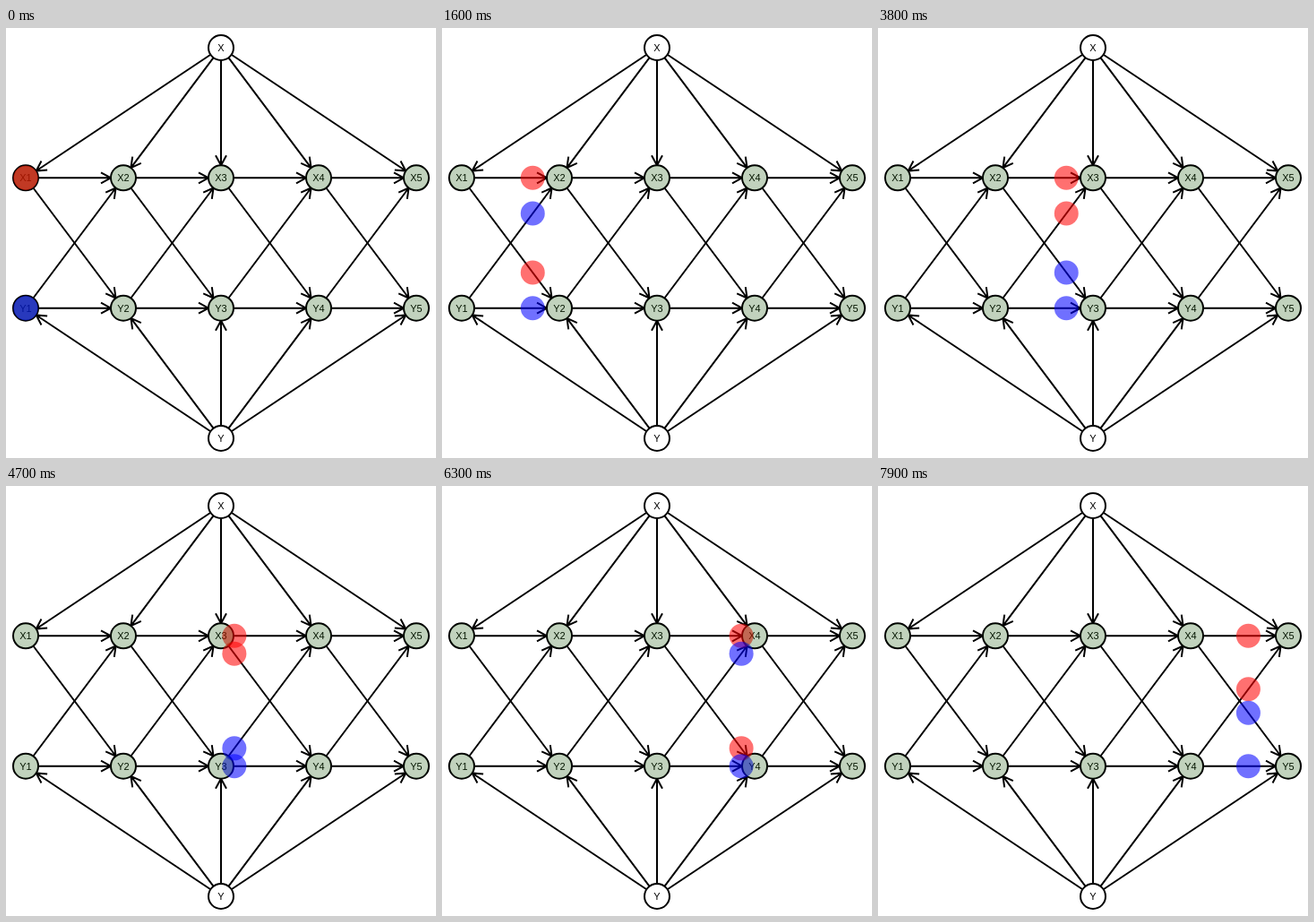
An HTML page for the animation above (8000 ms loop, 480 by 480 pixels).

```html
<!DOCTYPE html>
<html lang="en">
<head>
<meta charset="utf-8">
<title>Message passing on a layered graph</title>
<style>
  html, body { margin: 0; width: 100%; height: 100%; overflow: hidden; background: #fff; }
  svg { display: block; width: 100vw; height: 100vh; }
  .edge { fill: none; stroke: #000; stroke-width: 2; }
  .node { fill: #fff; stroke: #000; stroke-width: 2; }
  .tint { fill: rgb(16, 82, 1); fill-opacity: .26; }
  .red { fill: #f00; fill-opacity: .56; }
  .blue { fill: #00f; fill-opacity: .56; }
  text { font: 11px "Liberation Sans", Arial, sans-serif; text-anchor: middle; }
</style>
</head>
<body>
<svg viewBox="0 0 480 480"></svg>
<script>
const svg = document.querySelector("svg");
const LOOP = 8000, STEP = 100, HOP = 2200;
const LEFT = 22, GAP = 109, COLS = 5, MID = 240;
const ROW = { X: 167.3, Y: 312.7 };
const RADIUS = 14, DOT = 13.5;

function add(tag, attrs) {
  const el = document.createElementNS("http://www.w3.org/2000/svg", tag);
  for (const key in attrs) el.setAttribute(key, attrs[key]);
  return svg.appendChild(el);
}

const circle = (p, r, cls) => add("circle", { cx: p.x, cy: p.y, r, class: cls });

// Line between two node rims, ending in an open arrowhead.
function arrow(a, b) {
  const len = Math.hypot(b.x - a.x, b.y - a.y);
  const ux = (b.x - a.x) / len, uy = (b.y - a.y) / len;
  const at = (back, side) =>
    `${b.x - ux * back - uy * side} ${b.y - uy * back + ux * side}`;
  const tip = at(RADIUS, 0), tail = RADIUS + 11;
  add("path", {
    class: "edge",
    d: `M${at(len - RADIUS, 0)}L${tip}M${at(tail, 6)}L${tip}L${at(tail, -6)}`
  });
}

function node(p) {
  circle(p, RADIUS, "node");
  add("text", { x: p.x, y: p.y + 4 }).textContent = p.name;
}

const makeRow = name => Array.from({ length: COLS }, (_, i) =>
  ({ name: name + (i + 1), x: LEFT + GAP * i, y: ROW[name] }));
const rows = { X: makeRow("X"), Y: makeRow("Y") };
const roots = [{ name: "X", x: MID, y: 22 }, { name: "Y", x: MID, y: 458 }];
const layered = [...rows.X, ...rows.Y];

for (const root of roots) rows[root.name].forEach(p => arrow(root, p));
for (let i = 0; i < COLS - 1; i++)
  for (const from of "XY")
    for (const to of "XY") arrow(rows[from][i], rows[to][i + 1]);
[...roots, ...layered].forEach(node);

// Routes on even and odd hops: start row, end row.
const dots = [
  ["red", "XX", "XX"],
  ["red", "XY", "YX"],
  ["blue", "YY", "YY"],
  ["blue", "YX", "XY"]
].map(([cls, even, odd]) =>
  ({ routes: [even, odd], el: circle({ x: 0, y: 0 }, DOT, cls) }));

layered.forEach(p => circle(p, DOT, "tint"));

function draw(now) {
  const time = Math.floor((now % LOOP) / STEP) * STEP;
  const hop = Math.floor(time / HOP);
  const part = (time - hop * HOP) / HOP;
  for (const { routes, el } of dots) {
    const [from, to] = routes[hop % 2];
    el.setAttribute("cx", LEFT + GAP * (hop + part));
    el.setAttribute("cy", ROW[from] + (ROW[to] - ROW[from]) * part);
  }
}

const start = performance.now();
function tick() {
  draw(performance.now() - start);
  requestAnimationFrame(tick);
}
tick();
</script>
</body>
</html>
```
